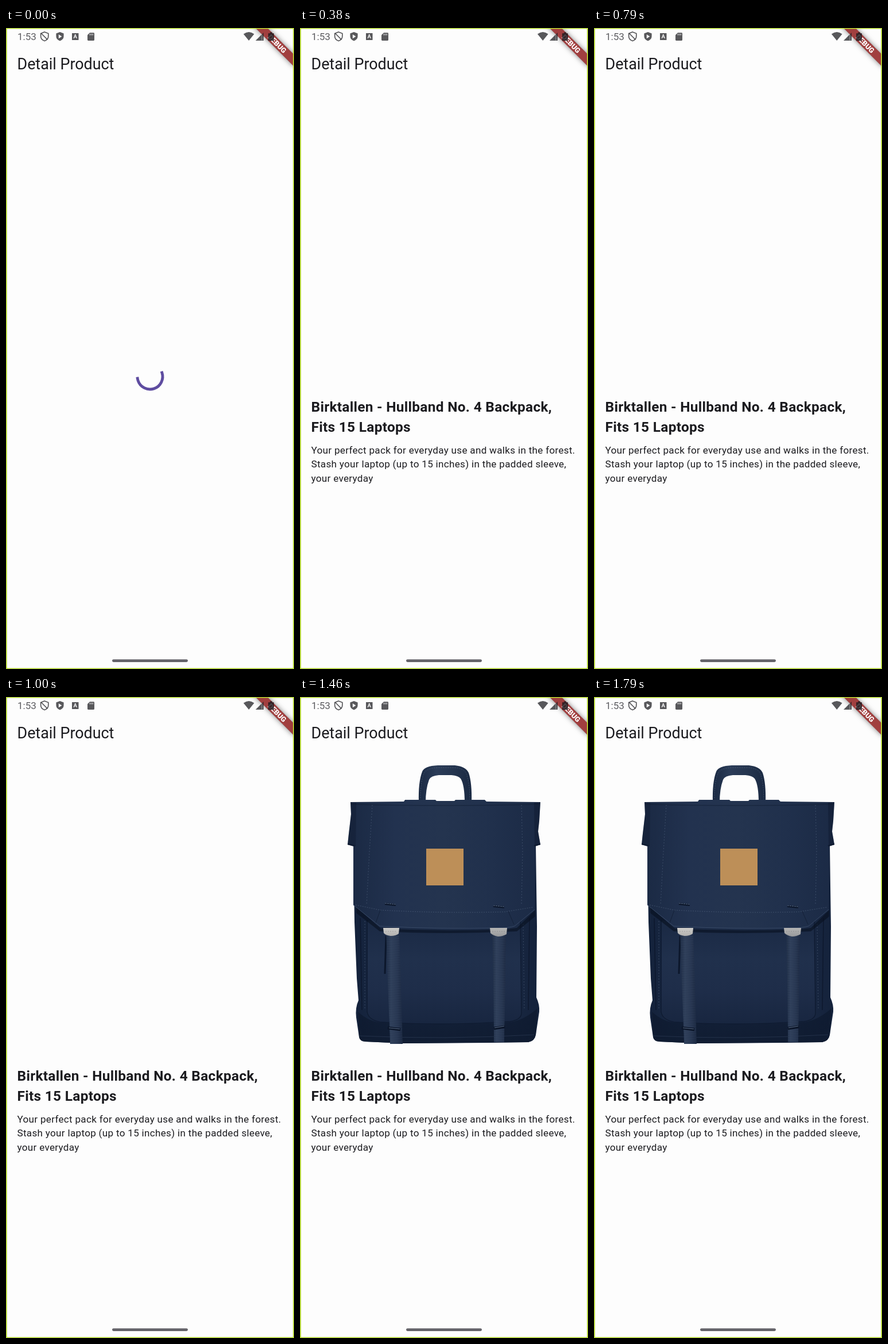
An HTML page with a canvas that plays this animation: 502 by 1116 pixels, repeating every 1.83 s.

```html
<!DOCTYPE html>
<html lang="en">
<head>
<meta charset="utf-8">
<title>Detail Product</title>
<style>
  html, body { margin: 0; width: 100%; height: 100%; overflow: hidden; background: #fdfcfd; }
  canvas { display: block; width: 502px; height: 1116px; }
</style>
</head>
<body>
<canvas id="stage" width="502" height="1116"></canvas>
<script>
const ctx = document.getElementById('stage').getContext('2d');
const W = 502, H = 1116;
const LOOP = 1830, TEXT_AT = 375, IMAGE_AT = 1105;
const DP = 1.2214;
const PAPER = '#fdfdfd', INK = '#1b1b1f', ICON = 'rgba(30,30,34,.74)';
const RAD = Math.PI / 180;

function fill(d, color, rule = 'nonzero') {
  ctx.fillStyle = color;
  ctx.fill(new Path2D(d), rule);
}

function line(d, color, width = 1, dash = []) {
  ctx.strokeStyle = color;
  ctx.lineWidth = width;
  ctx.setLineDash(dash);
  ctx.stroke(new Path2D(d));
  ctx.setLineDash([]);
}

function text(str, x, y, size, { weight = 400, color = INK, spacing = 0, align = 'left' } = {}) {
  ctx.font = `${weight} ${size}px Roboto, sans-serif`;
  ctx.letterSpacing = spacing + 'px';
  ctx.textAlign = align;
  ctx.fillStyle = color;
  ctx.fillText(str, x, y);
}

function gradient(x0, y0, x1, y1, ...colors) {
  const g = ctx.createLinearGradient(x0, y0, x1, y1);
  colors.forEach((c, i) => g.addColorStop(i / (colors.length - 1), c));
  return g;
}

// Cubic curve (0.4, 0, 0.2, 1), solved by bisection
function ease(x) {
  if (x >= 1) return 1;
  let lo = 0, hi = 1, s = 0.5;
  for (let i = 0; i < 20; i++) {
    s = (lo + hi) / 2;
    const r = 1 - s;
    if (1.2 * s * r * r + 0.6 * s * s * r + s ** 3 < x) lo = s; else hi = s;
  }
  return 3 * s * s * (1 - s) + s ** 3;
}

function drawSpinner(t) {
  const start = -18.6 + 0.106 * t;
  const sweep = 270 * ease(0.45 + 0.00096 * t);
  ctx.strokeStyle = '#5e4ca0';
  ctx.lineWidth = 4 * DP;
  ctx.lineCap = 'square';
  ctx.beginPath();
  ctx.arc(251, 607, 18 * DP, start * RAD, (start + sweep) * RAD);
  ctx.stroke();
  ctx.lineCap = 'butt';
}

function drawBanner() {
  const x = -40 * DP, y = 28 * DP, w = 80 * DP, h = 12 * DP;
  ctx.save();
  ctx.translate(W, -2);
  ctx.rotate(45 * RAD);
  ctx.save();
  ctx.shadowColor = 'rgba(0,0,0,.5)';
  ctx.shadowBlur = 9.7;
  ctx.fillStyle = '#7e7e7e';
  ctx.fillRect(x, y, w, h);
  ctx.restore();
  ctx.fillStyle = 'rgba(183,28,28,.63)';
  ctx.fillRect(x, y, w, h);
  text('DEBUG', 0, y + h / 2 + 4.4, 10.2 * DP, { weight: 900, color: '#fff', align: 'center' });
  ctx.restore();
}

function drawStatusBar() {
  text('1:53', 20, 20.6, 17, { color: '#5b5b5f' });
  const shield = x => `M${x} 7l6.6 2.5v5q0 5.6-6.6 8q-6.6-2.4-6.6-8v-5z`;
  line(shield(67.2), ICON, 1.7);
  line('M61.5 9.5L72 20', ICON, 1.7);
  fill(shield(94) + 'M91.8 11.2v7l5.6-3.5z', ICON, 'evenodd');
  fill('M115 9h11.5v12h-11.5z', ICON);
  text('A', 120.8, 18.4, 9.5, { weight: 700, color: '#fff', align: 'center' });
  fill('M146 8.3h6.7q1.3 0 1.3 1.3v11q0 1.3-1.3 1.3h-9.400q-1.300 0-1.300-1.300v-8.300z', ICON);
  line('M146.300 10v2.700M148.800 10v2.700M151.300 10v2.700', '#e4e4e6', 1.1);
  fill('M414 10.500Q423.300 3.500 432.600 10.500L423.300 22z', ICON);
  fill('M449 8v14h-14z', ICON);
  line('M446 10.500v11', 'rgba(255,255,255,.45)', 1);
  fill('M460 7.500h4v1.700h3v13h-10v-13h3z', 'rgba(30,26,30,.82)');
}

function drawStrap(edge, x0, x1, slant) {
  ctx.save();
  ctx.clip(new Path2D(edge));
  fill(edge, gradient(x0, 0, x1, 0, '#18263e', '#2d3d58', '#25344f', '#17243c'));
  for (let y = 416; y < 606; y += 3) line(`M${x0} ${y}L${x1} ${y + slant}`, 'rgba(105,122,148,.16)');
  ctx.restore();
}

function drawBackpack() {
  const seam = '#0f1b31', stitch = 'rgba(110,128,156,.38)';

  // Handle
  fill('M207 184Q206 148 213 130Q217 120 240 119L270 119Q289 121 294 132Q300 150 299 184H287Q287 153 280 142Q276 137 264 136L242 136Q228 137 225 144Q219 160 219 184z',
    gradient(207, 0, 299, 0, '#1a2942', '#2b3c58', '#25354f', '#1a2942'), 'evenodd');
  line('M210 176Q210 145 217 132Q221 124 241 123H268Q286 124 290 134Q296 152 296 178', stitch, 1, [2, 2]);

  // Main body
  fill('M93 258L95 392L99 490L102 528Q96 541 98 558L103 592Q104 599 114 600L180 603L330 602L398 601Q409 599 411 588L417 548Q418 536 412 523L413 400L411 258z',
    gradient(93, 0, 417, 0, '#13213a', '#1d2d49', '#1f2f4b', '#1c2b46', '#14223b'));
  fill('M118 390L384 390L386 550Q386 562 366 565Q250 573 140 566Q119 562 117 548z',
    gradient(0, 400, 0, 568, '#1b2a45', '#20304c', '#1e2d49', '#182640'));
  fill('M101 548Q122 567 145 567Q250 573 366 566Q390 563 414 542L411 588Q409 599 398 601L180 603L114 600Q104 599 103 592z',
    gradient(0, 545, 0, 603, 'rgba(11,22,42,.55)', 'rgba(15,27,48,.9)'));
  line('M117 388L117 548Q119 562 140 566Q250 573 366 565Q386 562 386 550L384 390', seam, 1.4);
  line('M105 385L108 545M400 385L398 545', 'rgba(9,18,36,.6)', 1.5);
  line('M113 390L113 545M389 395L391 545', stitch, 1, [2, 3]);
  line('M104 590Q250 597 408 588', 'rgba(80,98,126,.3)');

  // Flap, its rolled ends and the lower shadow
  fill('M98 366L141 403Q250 409 362 404L378 402L410 371V382L378 408Q250 414 139 408L98 376z', 'rgba(7,15,31,.6)');
  fill('M88 183L181 182L183 179H236L238 181H269L271 179H322L325 182L419 183L417 216L415 234L419 257L410 260L409 370L374 399Q364 402 345 402Q250 405 139 400L93 362V260L83 257L85 238L89 204z',
    gradient(83, 0, 419, 0, '#1a2943', '#22324f', '#24344f', '#20304c', '#1b2a45'));
  fill('M88 183L98 184L97 260L83 257L85 238L89 204z', 'rgba(12,23,43,.35)');
  fill('M408 184L419 183L417 216L415 234L419 257L409 260z', 'rgba(12,23,43,.4)');
  line('M83 256L96 259M408 259L419 256', seam, 2);
  line('M90 187Q250 191 417 187', 'rgba(10,20,38,.35)', 1.5);
  line('M126 188L121 270L116 362M386 188L388 270L386 362', stitch, 1, [2, 3]);
  line('M97 362L140 371Q250 377 357 374L406 366', stitch, 1, [2, 2]);
  line('M93 362L139 399Q250 405 345 402Q364 402 374 399L409 370', 'rgba(66,84,114,.7)', 1);
  line('M140 371L132 393M363 373L373 396', 'rgba(10,20,38,.5)');
  line('M148 360L167 362M337 364L356 366', '#0d182c', 4);
  line('M148 359L167 361M337 363L356 365', '#50617c', 1.2, [3, 1]);

  // Leather patch
  ctx.fillStyle = '#bd8f58';
  ctx.fillRect(220, 264, 65, 64);

  // Straps and buckles
  line('M150 416L148 482', '#0c172b', 3);
  drawStrap('M150 412H173L176 500L179 604H157L153 500z', 148, 180, 2);
  drawStrap('M335 412H359L358 500L356 601H338L337 500z', 333, 361, -2);
  line('M153 576L175 579M338 577L357 574', '#0b1528', 5);
  line('M155 576L174 578M339 576L356 573', '#566780', 1.2);
  fill('M145 402H173L172 412Q167 416 158 416Q149 415 146 411z', gradient(0, 401, 0, 416, '#d0cfcc', '#b2b1af'));
  fill('M331 402H361L360 413Q353 417 345 417Q336 415 332 411z', gradient(0, 401, 0, 417, '#b7b7b6', '#999a9c'));
  line('M149 408H169M335 408H357', 'rgba(90,90,92,.35)', 1, [2, 2]);
}

function drawDetails() {
  const spacing = 0.25 * DP, x = 19.5;
  const title = { weight: 700, spacing };
  text('Birktallen - Hullband No. 4 Backpack,', x, 668, 20 * DP, title);
  text('Fits 15 Laptops', x, 703, 20 * DP, title);
  const body = [
    'Your perfect pack for everyday use and walks in the forest.',
    'Stash your laptop (up to 15 inches) in the padded sleeve,',
    'your everyday'
  ];
  body.forEach((row, i) => text(row, x, 740.8 + i * 24.45, 14 * DP, { spacing }));
}

function draw(t) {
  ctx.fillStyle = PAPER;
  ctx.fillRect(0, 0, W, H);
  text('Detail Product', 19.5, 72.3, 22 * DP);
  if (t < TEXT_AT) drawSpinner(t);
  else drawDetails();
  if (t >= IMAGE_AT) drawBackpack();
  drawBanner();
  drawStatusBar();
  ctx.fillStyle = '#646369';
  ctx.beginPath();
  ctx.roundRect(185, 1099.2, 132, 4.8, 2.4);
  ctx.fill();
  ctx.strokeStyle = '#b2d62c';
  ctx.lineWidth = 2;
  ctx.strokeRect(0.7, 0.5, W - 1.4, H - 1);
}

const begin = performance.now();
function tick() {
  draw((performance.now() - begin) % LOOP);
  requestAnimationFrame(tick);
}
tick();
</script>
</body>
</html>
```
